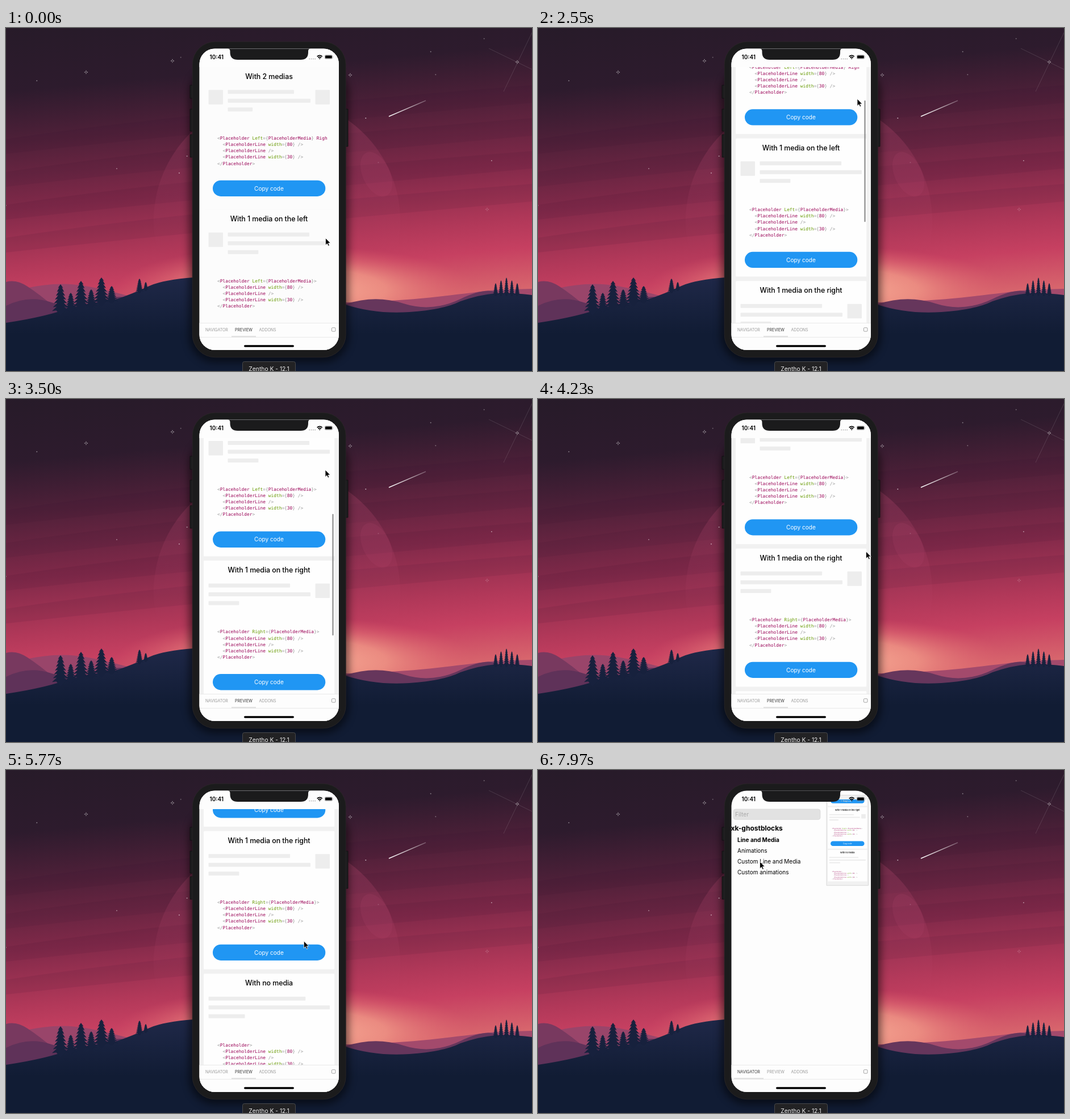
Recreate the animation shown at these times as an HTML page. Size 926 by 605 pixels, loop 8000 ms.

```html
<!DOCTYPE html>
<html lang="en">
<head>
<meta charset="utf-8">
<title>Placeholder stories</title>
<style>
html, body { margin: 0; width: 100%; height: 100%; overflow: hidden; background: #101b33; }
svg { display: block; width: 100%; height: 100%; font-family: Inter, "Liberation Sans", sans-serif; }
.code { font: 7.857px "DejaVu Sans Mono", monospace; white-space: pre; fill: #999; }
.tag { fill: #905; }
.attr { fill: #690; }
.title { font-size: 12.4px; font-weight: 500; text-anchor: middle; letter-spacing: -.05px; }
.button { font-size: 10.1px; fill: #fff; text-anchor: middle; }
.bone { fill: #ededed; }
.tabs { font-size: 7px; }
.story { font-size: 10px; }
</style>
</head>
<body>
<svg viewBox="0 0 926 605" preserveAspectRatio="xMidYMid slice">
  <defs>
    <linearGradient id="sky" gradientUnits="userSpaceOnUse" x1="0" y1="0" x2="50" y2="555">
      <stop offset="0" stop-color="#271b29"/>
      <stop offset=".2" stop-color="#2d1b2d"/>
      <stop offset=".36" stop-color="#4f2039"/>
      <stop offset=".57" stop-color="#802949"/>
      <stop offset=".75" stop-color="#b13859"/>
      <stop offset=".84" stop-color="#c64061"/>
      <stop offset="1" stop-color="#dc6f70"/>
    </linearGradient>
    <linearGradient id="moon" x1="0" y1="0" x2="0" y2="1">
      <stop offset="0" stop-color="#d2557f" stop-opacity=".26"/>
      <stop offset=".62" stop-color="#d2557f" stop-opacity="0"/>
    </linearGradient>
    <radialGradient id="glow">
      <stop offset="0" stop-color="#fbb49b"/>
      <stop offset=".5" stop-color="#ef9485" stop-opacity=".85"/>
      <stop offset="1" stop-color="#dc5f6b" stop-opacity="0"/>
    </radialGradient>
    <linearGradient id="land" gradientUnits="userSpaceOnUse" x1="0" y1="440" x2="0" y2="540">
      <stop offset="0" stop-color="#1f2848"/>
      <stop offset="1" stop-color="#111c34"/>
    </linearGradient>
    <linearGradient id="trail" gradientUnits="userSpaceOnUse" x1="674" y1="156" x2="739" y2="128">
      <stop offset="0" stop-color="#fff"/>
      <stop offset="1" stop-color="#fff" stop-opacity=".25"/>
    </linearGradient>
    <filter id="blur" x="-20%" y="-20%" width="140%" height="140%"><feGaussianBlur stdDeviation="7"/></filter>
    <clipPath id="screen"><rect x="340.5" y="36.5" width="245.5" height="531.5" rx="27"/></clipPath>
    <clipPath id="view"><rect x="340" y="62" width="246" height="482"/></clipPath>
    <path id="spark" d="M0-4Q0 0 4 0Q0 0 0 4Q0 0-4 0Q0 0 0-4M-1.4 0a1.4 1.4 0 0 0 2.8 0a1.4 1.4 0 0 0-2.8 0"/>
  </defs>

  <rect width="926" height="605" fill="url(#sky)"/>
  <g id="bands" fill="#2a0f2c" opacity=".08"/>
  <circle cx="477" cy="340" r="217" fill="url(#moon)"/>
  <ellipse cx="652" cy="258" rx="24" ry="42" fill="#b54a72" opacity=".14" transform="rotate(-25 652 258)"/>
  <ellipse cx="510" cy="462" rx="320" ry="78" fill="url(#glow)"/>
  <g fill="#fff">
    <use href="#spark" x="141" y="78"/>
    <use href="#spark" x="293" y="58"/>
    <use href="#spark" x="606" y="83"/>
    <use href="#spark" x="900" y="60"/>
    <use href="#spark" x="847" y="320" opacity=".45"/>
    <g id="stars"/>
  </g>
  <path d="M674 156L739 128" stroke="url(#trail)" stroke-width="1.4"/>
  <path d="M850 36L926 73M926 8L876 112" stroke="#fff" opacity=".12"/>

  <path d="M30 460Q90 446 140 455T240 480V540H30Z" fill="#99456a"/>
  <path d="M0 448Q18 443 38 456T85 492T130 520H0Z" fill="#78395f"/>
  <path d="M0 490Q40 470 80 484T170 480T260 500V540H0Z" fill="#5f3259"/>
  <path d="M598 484Q680 482 730 477T860 462L926 460V520H598Z" fill="#a34a6c"/>
  <path d="M598 487Q650 470 700 486T800 478T870 470L926 472V530H598Z" fill="#66365c"/>
  <path d="M0 520Q60 511 100 498T190 480Q225 468 250 456T330 440L598 488Q650 505 710 501T800 482Q835 470 862 468T926 471V605H0Z" fill="url(#land)"/>
  <g id="trees" fill="#17213d"/>

  <rect x="322" y="70" width="282" height="520" rx="46" opacity=".5" filter="url(#blur)"/>
  <path d="M324 101h5v23h-5zM324 143h5v39h-5zM324 188h5v40h-5zM597 143h5v66h-5z" fill="#1c1c1e" stroke="#0c0c0e" stroke-width=".7"/>
  <rect x="328.2" y="24.2" width="270" height="556.6" rx="40" fill="#1b1b1c" stroke="#2b2729" stroke-width=".8"/>

  <g clip-path="url(#screen)">
    <rect x="340" y="36" width="247" height="533" fill="#fdfdfd"/>
    <g id="panel">
      <rect x="344" y="69" width="153" height="18.5" rx="4" fill="#e2e2e2" stroke="#d6d6d6" stroke-width=".7"/>
      <text x="347" y="82" font-size="10.2" fill="#a9a9a9">Filter</text>
      <text x="339.5" y="107" font-size="12" font-weight="700">xk-ghostblocks</text>
      <g class="story">
        <text x="351" y="126.5" font-weight="700">Line and Media</text>
        <text x="351" y="146">Animations</text>
        <text x="351" y="165">Custom Line and Media</text>
        <text x="351" y="184.3">Custom animations</text>
      </g>
    </g>
    <g id="preview">
      <rect id="back" x="340.5" y="37" width="245" height="531"/>
      <g clip-path="url(#view)"><g id="cards"/></g>
      <rect id="cover" x="340" y="36" width="247" height="33" fill="#fdfdfd"/>
      <rect id="edge" x="340.5" y="37" width="245" height="531" fill="none" stroke="#d9d9d9" vector-effect="non-scaling-stroke"/>
    </g>
    <rect id="bar" x="574.4" width="2.2" height="214.5" rx="1.1" fill="#8c8c8c"/>
    <rect x="340" y="520.8" width="247" height="48" fill="#fdfdfd"/>
    <path d="M340 520.5h247M340 545.5h247" stroke="#e9e9e9"/>
    <rect id="line" y="543" height="2.4" fill="#e2e2e2"/>
    <g class="tabs">
      <text x="351" y="534.6">NAVIGATOR</text>
      <text x="403" y="534.6">PREVIEW</text>
      <text x="445.5" y="534.6">ADDONS</text>
    </g>
    <rect x="573.5" y="528.7" width="6.4" height="6.4" rx="1" fill="none" stroke="#999" stroke-width=".9"/>
    <rect x="419" y="559.3" width="88" height="3.5" rx="1.75"/>

    <text x="358.5" y="55" font-size="10" font-weight="600">10:41</text>
    <path d="M533.5 54.5h11.5" stroke="#aaa" stroke-width="1.6" stroke-dasharray="1.6 1.7"/>
    <path d="M547.7 50.4Q552.2 46.4 556.7 50.4M549.5 52.5Q552.2 50.2 554.9 52.5" fill="none" stroke="#000" stroke-width="1.7"/>
    <path d="M550.8 53.8Q552.2 52.8 553.6 53.8L552.2 55.3Z"/>
    <rect x="561" y="47.7" width="13.8" height="6.8" rx="2" fill="none" stroke="#888" stroke-width=".6"/>
    <rect x="562" y="48.6" width="11.8" height="5" rx="1.2"/>
    <path d="M575.7 50q1.3 1.1 0 2.2z" fill="#777"/>
    <path d="M390 36Q394.5 36.5 394.5 41V43Q394.5 56 408 56H518.5Q532 56 532 43V41Q532 36.5 536.5 36Z" fill="#1b1b1c"/>
  </g>

  <rect x="416.5" y="588.5" width="93" height="30" rx="3" fill="#222224" stroke="#48484a"/>
  <text x="463" y="604.8" font-size="10.3" fill="#ececec" text-anchor="middle">Zentho K - 12.1</text>
  <path id="cursor" d="M0 0V12.5L2.9 9.8L4.9 14L6.9 13.1L5 9H8.8Z" stroke="#fff" stroke-width=".8"/>
</svg>
<script>
const $ = id => document.getElementById(id);
const set = (el, attrs) => { for (const k in attrs) el.setAttribute(k, attrs[k]); };
const repeat = (n, make) => Array.from({ length: n }, (_, i) => make(i)).join('');
const clamp = k => Math.min(1, Math.max(0, k));

// Scenery
let seed = 7;
const random = () => (seed = seed * 16807 % 2147483647) / 2147483647;

$('bands').innerHTML = repeat(4, i => {
  const y = 196 + 58 * i;
  return `<path d="M0 ${y}Q300 ${y - 46} 926 ${y - 95}v31Q300 ${y - 8} 0 ${y + 26}Z"/>`;
});

$('stars').innerHTML = repeat(18, () =>
  `<circle cx="${926 * random()}" cy="${340 * random()}" r="1" opacity="${.15 + .5 * random()}"/>`);

function tree(x, top, base, half) {
  const tiers = 7, right = [], left = [];
  for (let i = 1; i <= tiers; i++) {
    const y = top + (base - top) * i / (tiers + 1), w = half * (.2 + .8 * i / tiers);
    right.push(`${x + w} ${y}`, `${x + w * .5} ${y - 1}`);
    left.unshift(`${x - w * .5} ${y - 1}`, `${x - w} ${y}`);
  }
  return `<path d="M${x} ${top}L${right.join('L')}L${x + 1} ${base}H${x - 1}L${left.join('L')}Z"/>`;
}
$('trees').innerHTML =
  repeat(6, i => tree(96 + 18 * i, 452 - 3 * i + i % 2 * 18, 506 - 4 * i, 15 - i % 2 * 4)) +
  repeat(2, i => tree(235 + 11 * i, 442 + 6 * i, 468 - 4 * i, 7 - 2 * i)) +
  repeat(5, i => tree(862 + 9.5 * i, 440 + 5 * Math.abs(i - 2), 473, 5));

// Story cards
const paint = code => code.replace(/(\w+(?==))|(\w+)|([^\w\s]+)/g, (all, attr, tag) =>
  attr ? `<tspan class="attr">${attr}</tspan>` :
  tag ? `<tspan class="tag">${tag}</tspan>` :
  all.replace(/</g, '&lt;').replace(/>/g, '&gt;'));

const bone = (x, y, w, h) => `<rect class="bone" x="${x}" y="${y}" width="${w}" height="${h}" rx="1"/>`;

function card([title, left, right], i) {
  const x = left ? 390.5 : 356.5, w = (right ? 536 : 570) - x;
  const side = name => ` ${name}={PlaceholderMedia}`;
  const code = [
    `<Placeholder${left ? side('Left') : ''}${right ? side('Right') : ''}>`.slice(0, 41),
    '  <PlaceholderLine width={80} />',
    '  <PlaceholderLine />',
    '  <PlaceholderLine width={30} />',
    '</Placeholder>'];
  return `<g transform="translate(0 ${85 + 251.5 * i})">
    <rect class="sheet" x="348" y="-16.3" width="230.3" height="243.8" rx="1.5"/>
    <text class="title" x="463" y="4.5">${title}</text>
    ${left ? bone(356.5, 24.2, 25.5, 25.5) : ''}${right ? bone(544.5, 24.2, 25.5, 25.5) : ''}
    ${[.8, 1, .3].map((part, n) => bone(x, 24.2 + 15.5 * n, w * part, 7)).join('')}
    ${code.map((row, n) => `<text class="code" x="372" y="${112 + 11.15 * n}">${paint(row)}</text>`).join('')}
    <rect x="364" y="183.7" width="198.3" height="28.3" rx="14.1" fill="#2096f3"/>
    <text class="button" x="463" y="201.6">Copy code</text></g>`;
}
$('cards').innerHTML = [['With 2 medias', 1, 1], ['With 1 media on the left', 1, 0],
  ['With 1 media on the right', 0, 1], ['With no media', 0, 0]].map(card).join('');

// Motion: each move is [start, end, target]
const ease = (t, start, end) => 1 - (1 - clamp((t - start) / (end - start))) ** 1.5;
const follow = (from, moves, t) => moves.reduce((now, [start, end, to]) =>
  now + (to - now) * ease(t, start, end), from);

const scrolls = [[2030, 3800, 308], [4850, 5270, 464]];
const swipes = [
  [450, 570, [562, 379]],
  [930, 1450, [572, 384]],
  [1810, 2550, [562, 125]],
  [3980, 4230, [577.5, 268.5]],
  [4230, 4750, [572, 411]],
  [4860, 5130, [571, 119]],
  [5600, 6150, [462, 546]],
  [6150, 6480, [368.5, 530]],
  [7480, 7970, [390.5, 161.5]]];
const axis = n => swipes.map(([start, end, to]) => [start, end, to[n]]);
const across = axis(0), down = axis(1);

const tabs = document.querySelectorAll('.tabs text');
const sheets = document.querySelectorAll('.sheet');
const press = 7000, open = 7210;

function frame() {
  const t = performance.now() % 8000;
  const top = follow(0, scrolls, t);
  const shown = Math.max(...scrolls.map(([start, end]) => clamp((t - start) / 80) * clamp((end + 200 - t) / 200)));
  const moved = t > scrolls[0][0], browsing = t >= open;
  const p = ease(t, open, open + 420);

  set($('cursor'), { transform: `translate(${follow(562.5, across, t)} ${follow(370.5, down, t)})` });
  set($('cards'), { transform: `translate(0 ${-top})` });
  set($('bar'), { y: 69.4 + .465 * top, opacity: shown });
  set($('back'), { fill: moved ? '#f1f1f1' : '#fcfcfc' });
  sheets.forEach(s => set(s, { fill: moved ? '#fefefe' : '#fcfcfc' }));

  set($('preview'), { transform: `translate(${405.85 * p} ${33.3 * p}) scale(${1 - .7 * p})` });
  set($('cover'), { opacity: 1 - p });
  set($('edge'), { opacity: p });
  set($('panel'), { transform: `translate(${-165 * (1 - p)} 0)` });
  set($('line'), browsing ? { x: 345, width: 52 } : { x: 397, width: 43 });
  tabs.forEach((tab, i) => set(tab, {
    fill: i === (browsing ? 0 : 1) ? '#333' : '#999',
    opacity: i === 0 && t >= press && !browsing ? .75 : 1
  }));
  requestAnimationFrame(frame);
}
frame();
</script>
</body>
</html>
```
